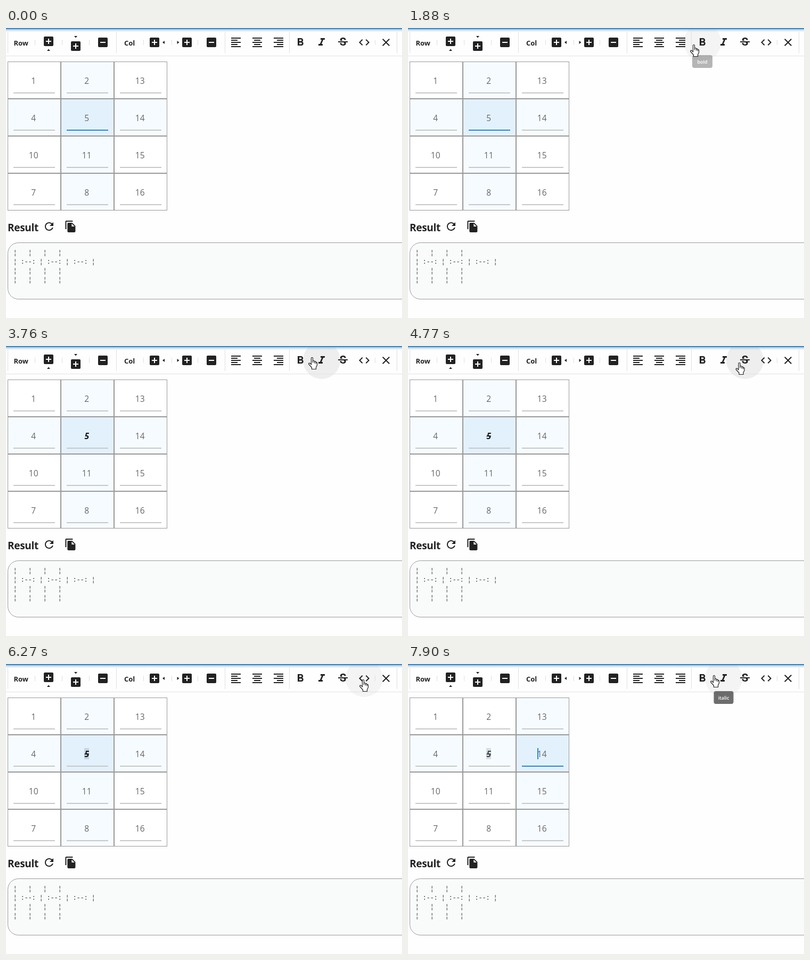
Animation of 744x545 px, one loop 8 s. Source, as an HTML page:

```html
<!DOCTYPE html>
<html lang="en">
<head>
<meta charset="utf-8">
<title>Table editor</title>
<style>
  html, body { margin: 0; width: 100%; height: 100%; overflow: hidden; background: #fefefe; }
  svg { display: block; font-family: "Open Sans", "Noto Sans", sans-serif; }
  .label { font-size: 13px; font-weight: 700; fill: #222; }
  .cell { font-size: 15.5px; fill: #666; text-anchor: middle; }
  .code { font: 13px "Liberation Mono", monospace; letter-spacing: -.8px; white-space: pre; fill: #444; }
  .tip { font-size: 9px; font-weight: 600; fill: #fff; text-anchor: middle; }
</style>
</head>
<body>
<svg id="stage" width="744" height="545" viewBox="0 0 744 545">
  <defs>
    <linearGradient id="shade" x2="0" y2="1">
      <stop stop-color="#8fa5b5" stop-opacity=".7"/><stop offset="1" stop-color="#ccc" stop-opacity="0"/>
    </linearGradient>
  </defs>
</svg>
<script>
const TICK = 125.4, LOOP = 8000;
const stage = document.getElementById('stage');

function add(tag, attrs, text, parent = stage) {
  const el = document.createElementNS('http://www.w3.org/2000/svg', tag);
  set(el, attrs);
  if (text) el.textContent = text;
  return parent.appendChild(el);
}
function set(el, attrs) {
  for (const k in attrs) el.setAttribute(k, attrs[k]);
}
const rect = (x, y, width, height, fill, more) => add('rect', {x, y, width, height, fill, ...more});
const icon = (x, y, d) => add('path', {d, fill: '#222', transform: `translate(${x} ${y})`});
const show = (el, on) => set(el, {visibility: on ? 'visible' : 'hidden'});

// Toolbar
const hover = add('circle', {cy: 27, r: 35});
rect(0, 2, 744, 6, 'url(#shade)');
rect(0, 0, 744, 2, '#2490e0');
rect(0, 52, 744, 1, '#e2e2e2');
for (const x of [3, 207, 411, 532, 734]) rect(x, 7, 1, 40, '#e0e0e0');
for (const x of [54, 105, 156, 258, 311, 360, 693]) rect(x, 22, 1, 10, '#e0e0e0');
add('text', {x: 14.5, y: 33, class: 'label'}, 'Row');
add('text', {x: 222, y: 33, class: 'label'}, 'Col');

const box = 'M19 3H5c-1.1 0-2 .9-2 2v14c0 1.1.9 2 2 2h14c1.1 0 2-.9 2-2V5c0-1.1-.9-2-2-2z';
const plus = box + 'm-2 10h-4v4h-2v-4H7v-2h4V7h2v4h4v2z';
const minus = box + 'm-2 10H7v-2h10v2z';
icon(68, 13, plus);
icon(119, 22, plus);
icon(170, 15, minus);
icon(267, 15, plus);
icon(328, 15, plus);
icon(374, 15, minus);
icon(80, 39.5, 'M0 0l3 3.5h-6z');
icon(131, 18.5, 'M0 0l3-3.5h-6z');
icon(294, 27, 'M0 0l4-3v6z');
icon(325.5, 27, 'M0 0l-4-3v6z');

const bars = short => `M3 3h18v2H3zM${short} 7h12v2h-12zM3 11h18v2H3zM${short} 15h12v2h-12zM3 19h18v2H3z`;
const buttons = [
  [432, bars(3)],
  [472, bars(6)],
  [512, bars(9)],
  [553, 'M15.6 10.79c.97-.67 1.65-1.77 1.65-2.79 0-2.26-1.75-4-4-4H7v14h7.04c2.09 0 3.71-1.7 3.71-3.79 0-1.52-.86-2.82-2.15-3.42zM10 6.5h3c.83 0 1.5.67 1.5 1.5s-.67 1.5-1.5 1.5h-3v-3zm3.5 9H10v-3h3.5c.83 0 1.5.67 1.5 1.5s-.67 1.5-1.5 1.5z'],
  [593, 'M10 4v3h2.21l-3.42 8H6v3h8v-3h-2.21l3.42-8H18V4z'],
  [633, 'M6.85 7.08C6.85 4.37 9.45 3 12.24 3c1.64 0 3 .49 3.9 1.28.77.65 1.46 1.73 1.46 3.24h-3.01c0-.31-.05-.59-.15-.85-.29-.86-1.2-1.28-2.25-1.28-1.86 0-2.34 1.02-2.34 1.7 0 .48.25.88.74 1.21.38.25.77.48 1.41.7H7.39c-.21-.34-.54-.89-.54-1.92zM21 12v-2H3v2h9.62c1.15.45 1.96.75 1.96 1.97 0 1-.81 1.67-2.28 1.67-1.54 0-2.93-.54-2.93-2.51H6.4c0 .55.08 1.13.24 1.58.81 2.29 3.29 3.3 5.67 3.3 2.27 0 5.3-.89 5.3-4.05 0-.3-.01-1.16-.48-1.94H21z'],
  [673, 'M9.4 16.6 4.8 12l4.6-4.6L8 6l-6 6 6 6zm5.2 0 4.6-4.6-4.6-4.6L16 6l6 6-6 6z'],
  [714, 'M19 6.41 17.59 5 12 10.59 6.41 5 5 6.41 10.59 12 5 17.59 6.41 19 12 13.41 17.59 19 19 17.59 13.41 12z']
];
for (const [x, d] of buttons) icon(x - 12, 15, d);

// Table
const values = [[1, 2, 13], [4, 5, 14], [10, 11, 15], [7, 8, 16]];
const cells = values.map((row, r) => row.map((value, c) => {
  const x = 3 + c * 100, y = 63 + r * 70;
  const back = rect(x + .5, y + .5, 99, 69, '#fff', {stroke: '#999'});
  const line = rect(x + 11, y + 58, 78, 2, '#c8c8c8');
  const mark = r === 1 && c === 1 && rect(147, 158, 9, 21, '#000', {'fill-opacity': .12});
  const text = add('text', {x: x + 48.7, y: y + 42, class: 'cell'}, value);
  return {back, line, mark, text};
}));
const caret = rect(156, 158, 2, 21, '#1e88e5');

// Result
add('text', {x: 3, y: 382, style: 'font-size:19px;font-weight:700;letter-spacing:-.3px', fill: '#222'}, 'Result');
icon(69, 361, 'M17.65 6.35C16.2 4.9 14.21 4 12 4c-4.42 0-7.99 3.58-7.99 8s3.57 8 7.99 8c3.73 0 6.84-2.55 7.73-6h-2.08c-.82 2.33-3.04 4-5.65 4-3.31 0-6-2.69-6-6s2.69-6 6-6c1.66 0 3.14.69 4.22 1.78L13 11h7V4z');
icon(109.4, 361, 'M16 1H4c-1.1 0-2 .9-2 2v14h2V3h12zm-1 4 6 6v10c0 1.1-.9 2-2 2H7.99C6.89 23 6 22.1 6 21V7c0-1.1.89-2 1.99-2h7zm-1 7h5.5L14 6.5z');
rect(3.5, 403.5, 780, 106, '#f9fbfa', {rx: 20, stroke: '#999'});
const blank = '¦   ¦   ¦   ¦';
[blank, '¦ :--: ¦ :--: ¦ :--: ¦', blank, blank].forEach((s, i) =>
  add('text', {x: 13.2, y: 426 + i * 17, class: 'code'}, s));

// Tooltips: label, centre, width, first and last tick
const tips = [
  ['bold', 553, 38, 15, 20],
  ['italic', 593, 37, 27, 29],
  ['strikethrough', 633, 76, 35, 37],
  ['code', 673, 38, 43, 44],
  ['italic', 593, 37, 62, 64]
].map(([label, x, width, from, to]) => {
  const el = add('g', {});
  add('rect', {x: x - width / 2, y: 51, width, height: 24, rx: 4, fill: '#616161', 'fill-opacity': .92}, '', el);
  add('text', {x, y: 66.5, class: 'tip'}, label, el);
  return {el, from, to};
});

// Pointers
const pointer = (d, width = 1) => add('path', {d, fill: '#fff', stroke: '#222', 'stroke-width': width, 'stroke-linejoin': 'round'});
const pointers = {
  arrow: pointer('M.5.5V16.5l3.7-3.5 2.6 5.8 2.5-1.1-2.5-5.6h5z'),
  hand: pointer('M5.5 14V2a1.5 1.5 0 0 1 3 0V10V8a1.5 1.5 0 0 1 3 0V11V9a1.4 1.4 0 0 1 2.7 0V12V10.4a1.2 1.2 0 0 1 2.3 0V15L14.5 19V22.5H6.5V19.5L1 13.5Q0 11.5 2 11.2Q3.5 11 5.5 14z', 1.2),
  beam: pointer('M-3-8h2l1 1 1-1h2M0-7V7M-3 8h2l1-1 1 1h2')
};
set(pointers.beam, {fill: 'none'});

// Pointer path: tick, x, y
const path = [
  [6, 208, 465], [7, 513, 272], [8, 397, 193], [10, 434, 70], [11, 434, 48], [13, 485, 18],
  [15, 530, 31], [25, 530, 31], [27, 568, 21], [32, 568, 21], [34, 608, 18], [36, 615.5, 31],
  [40, 615.5, 31], [42, 655, 16], [44, 670, 23], [49, 670, 23], [50, 664, 29], [54, 262, 156],
  [55, 256.5, 154], [57, 256.5, 154], [61, 545, 18], [63, 568, 21]
];
function pointerAt(n) {
  const i = path.findIndex(p => p[0] >= n);
  const b = path[i], a = path[Math.max(0, i - 1)];
  const k = a === b ? 1 : (n - a[0]) / (b[0] - a[0]);
  return [a[1] + (b[1] - a[1]) * k, a[2] + (b[2] - a[2]) * k];
}

function draw(n) {
  const [x, y] = pointerAt(n);
  const kind = y < 45 && x > 400 ? 'hand' : x < 303 && y > 63 && y < 343 ? 'beam' : 'arrow';
  for (const k in pointers) {
    show(pointers[k], k === kind && n >= 6);
    set(pointers[k], {transform: `translate(${x} ${y})`});
  }

  const over = kind === 'hand' && buttons.find(b => Math.abs(b[0] - x - 7) <= 20);
  const pressed = [20, 21, 29, 30, 37, 38, 44].includes(n);
  show(hover, over);
  if (over) set(hover, {cx: over[0], fill: pressed ? '#eeeeee' : '#f4f4f4'});

  for (const {el, from, to} of tips) {
    show(el, n >= from && n <= to);
    set(el, {opacity: n === from || n === to ? .5 : 1});
  }

  const moved = n >= 55, col = moved ? 2 : 1, focus = n < 20 || moved;
  cells.forEach((row, r) => row.forEach((cell, c) => {
    const active = r === 1 && c === col;
    set(cell.back, {fill: active ? '#e3f1fd' : r === 1 || c === col ? '#f6fbff' : '#fff'});
    set(cell.line, {fill: active && focus ? '#1e88e5' : '#c8c8c8'});
  }));

  const five = cells[1][1];
  five.text.style.cssText = (n >= 20 ? `font-weight:700;fill:${moved ? '#37434c' : '#111'};` : '') +
    (n >= 29 ? 'font-style:italic;' : '') + (n >= 37 ? 'text-decoration:line-through' : '');
  show(five.mark, n >= 44);

  const blink = moved ? (n - 55) % 8 < 4 : n > 0 && n < 13 && (n - 1) % 8 < 4;
  show(caret, blink);
  set(caret, {x: moved ? 243 : 156});
}

let last = -1;
function frame(now) {
  const n = Math.min(63, Math.floor((now % LOOP + 5) / TICK));
  if (n !== last) draw(last = n);
  requestAnimationFrame(frame);
}
draw(0);
requestAnimationFrame(frame);
</script>
</body>
</html>
```
